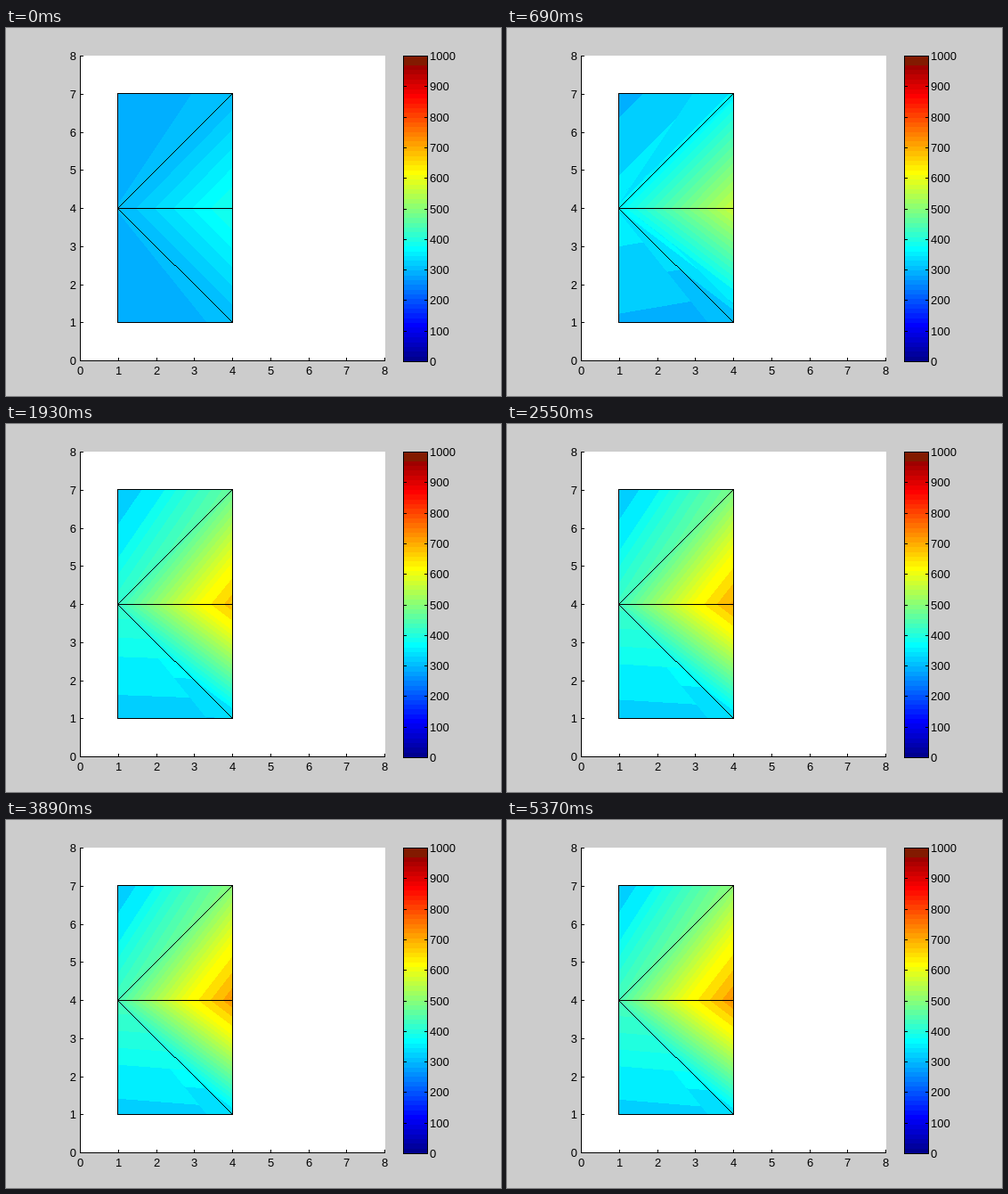
Animation, 556 px wide and 413 px high, one loop 8690 ms. Source, as an HTML page with a canvas:

```html
<!DOCTYPE html>
<html lang="en">
<head>
<meta charset="utf-8">
<title>Triangle mesh heating</title>
<style>
  html, body { margin: 0; width: 100%; height: 100%; overflow: hidden; background: #ccc; }
  svg, canvas { position: absolute; left: 0; top: 0; display: block; }
  canvas { left: 125px; top: 73px; }
  text { font: 13px "Liberation Sans", Arial, sans-serif; fill: #000; }
</style>
</head>
<body>
<svg id="plot" width="556" height="413" viewBox="0 0 556 413"></svg>
<canvas id="mesh" width="130" height="258"></canvas>
<script>
const LOOP = 8690;
const STARTS = [
  0, 150, 330, 510, 690, 770, 920, 1070,
  1300, 1380, 1550, 1730, 1900, 2080, 2250,
  2400, 2550, 2720, 2900, 3070, 3250, 3420,
  3570, 3740, 3910, 4080, 4240, 4410, 4580,
  4730, 4890, 5050, 5210, 5370
];

// 64-step jet colormap covering 0..1000
const ramp = d => Math.max(0, Math.min(1, 1.5 - Math.abs(d) / 16));
const JET = Array.from({ length: 64 }, (_, i) =>
  [48, 32, 16].map(mid => Math.round(255 * ramp(i + 1 - mid))));
JET[62] = JET[63] = [130, 26, 0];
const level = value => Math.max(0, Math.min(63, Math.floor(value * 0.064)));

// Node temperature: steady value, slow mode, fast mode
const NODES = {
  topLeft: [315, 34, 12],
  topRight: [505, 310, 104],
  midLeft: [437, 155, 15],
  midRight: [735, 342, 0],
  lowLeft: [330, 45, 8],
  lowRight: [339, 90, 49]
};

function temperatures(step) {
  const out = {};
  for (const [name, [steady, slow, fast]] of Object.entries(NODES))
    out[name] = steady - slow * 0.84 ** step + fast * 0.57 ** step;
  return out;
}

// Linear interpolation inside the four triangles
function field(t, x, y) {
  const u = x / 129;
  if (y <= 129) {
    const v = y / 129;
    return u + v < 1
      ? t.topLeft + u * (t.topRight - t.topLeft) + v * (t.midLeft - t.topLeft)
      : t.midRight + (1 - u) * (t.midLeft - t.midRight) + (1 - v) * (t.topRight - t.midRight);
  }
  const v = (y - 129) / 128;
  return u > v
    ? t.midLeft + u * (t.midRight - t.midLeft) + v * (t.lowRight - t.midRight)
    : t.midLeft + v * (t.lowLeft - t.midLeft) + u * (t.lowRight - t.lowLeft);
}

const canvas = document.getElementById("mesh");
const ctx = canvas.getContext("2d");
const W = canvas.width, H = canvas.height;

const isEdge = (x, y) =>
  x === 0 || x === W - 1 || y === 0 || y === H - 1 || y === 129 ||
  (y < 129 ? x + y === 129 : y === 129 + Math.round(x * 128 / 129));

const distance = (a, b) => a.reduce((sum, c, i) => sum + (c - b[i]) ** 2, 0);

// A pixel keeps its colour until the new one is clearly different
function buildFrames() {
  const shown = new Int8Array(W * H).fill(-1);
  return STARTS.map((_, step) => {
    const t = temperatures(step);
    const image = ctx.createImageData(W, H);
    for (let y = 0, p = 0; y < H; y++) {
      for (let x = 0; x < W; x++, p++) {
        const next = level(field(t, x, y));
        if (shown[p] < 0 || distance(JET[next], JET[shown[p]]) > 300) shown[p] = next;
        const color = isEdge(x, y) ? [0, 0, 0] : JET[shown[p]];
        image.data.set([...color, 255], p * 4);
      }
    }
    return image;
  });
}

function drawPlot() {
  const rect = (x, y, w, h, fill) =>
    `<rect x="${x}" y="${y}" width="${w}" height="${h}" fill="${fill}" shape-rendering="crispEdges"/>`;
  const label = (x, y, text, anchor) =>
    `<text x="${x}" y="${y}" text-anchor="${anchor}">${text}</text>`;
  let s = rect(83, 31, 343, 343, "#fff") + rect(83, 31, 1, 343, "#000") + rect(83, 373, 343, 1, "#000");
  for (let i = 0; i <= 8; i++) {
    const x = Math.round(83 + i * 42.75), y = Math.round(373 - i * 42.75);
    s += rect(x, 370, 1, 4, "#000") + rect(83, y, 4, 1, "#000");
    s += label(x + 0.5, 389, i, "middle") + label(79, y + 5, i, "end");
  }
  const barTop = i => Math.round(374 - i * 343 / 64);
  JET.forEach((c, i) => {
    s += rect(446, barTop(i + 1), 28, barTop(i) - barTop(i + 1), `rgb(${c})`);
  });
  s += '<rect x="446.5" y="31.5" width="27" height="343" fill="none" stroke="#000" shape-rendering="crispEdges"/>';
  for (let i = 0; i <= 10; i++) {
    const y = Math.round(374 - i * 34.3);
    s += rect(446, y, 4, 1, "#000") + rect(470, y, 4, 1, "#000");
    s += label(476, y + 5, i * 100, "start");
  }
  document.getElementById("plot").innerHTML = s;
}

drawPlot();
const frames = buildFrames();
let current = -1;

function tick() {
  const time = performance.now() % LOOP;
  const step = STARTS.findLastIndex(start => start <= time);
  if (step !== current) {
    current = step;
    ctx.putImageData(frames[step], 0, 0);
  }
  requestAnimationFrame(tick);
}
tick();
</script>
</body>
</html>
```
